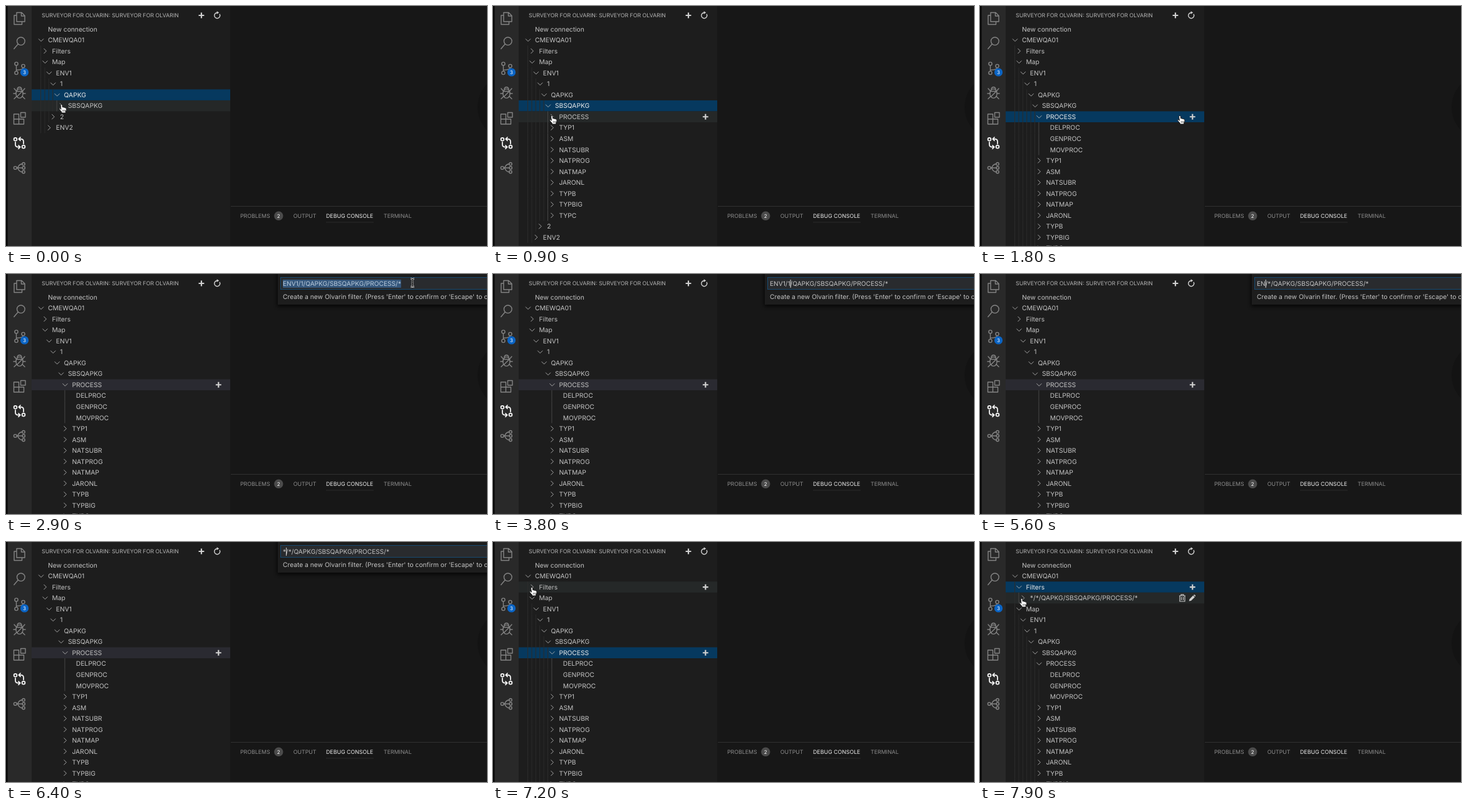
Recreate the animation shown at these times as an HTML page. Size 768x384 px, loop 8000 ms.

```html
<!DOCTYPE html>
<html lang="en">
<head>
<meta charset="utf-8">
<title>Tree filter</title>
<style>
  html, body { margin: 0; width: 100%; height: 100%; overflow: hidden; background: #171717; }
  svg { display: block; width: 768px; height: 384px; font-family: Inter, "Liberation Sans", sans-serif; }
  text { font-size: 10.25px; fill: #c4c4c4; white-space: pre; text-rendering: geometricPrecision; }
  .cap { font-size: 8.8px; fill: #b4b4b4; }
  .dim { fill: #8d8d8d; }
  .on { fill: #ececec; }
  .tiny { font-size: 8px; fill: #fff; text-anchor: middle; }
  .icon { fill: none; stroke: #848484; stroke-width: 1.4; stroke-linejoin: round; stroke-linecap: round; }
  .chev { fill: none; stroke: #b4b4b4; stroke-width: .9; }
  .plus { stroke: #d0d0d0; stroke-width: 2.2; }
  #entry { font-size: 10.15px; }
</style>
</head>
<body>
<svg viewBox="0 0 768 384">
  <defs>
    <filter id="blur" x="-10%" y="-30%" width="120%" height="170%"><feGaussianBlur stdDeviation="3"/></filter>
    <path id="plus" class="plus" d="M-4.4 0H4.4M0 -4.4V4.4"/>
    <g id="trash" fill="none" stroke="#c8c8c8" stroke-width="1.2">
      <path d="M-5 -3.6H5M-2 -3.6V-5.4H2V-3.6M-4 -3.6V5.4H4V-3.6M-1.5 -1.5V3.5M1.5 -1.5V3.5"/>
    </g>
    <path id="pencil" fill="#d0d0d0" d="M-5 5L-4.2 1.8L1.6 -4L4.2 -1.4L-1.7 4.3ZM2.3 -4.6L3.2 -5.3Q4 -5.6 4.9 -4.6Q5.6 -3.8 5.2 -2.8L4.8 -2Z"/>
  </defs>

  <rect width="768" height="384" fill="#171717"/>
  <circle cx="806" cy="162" r="53" fill="#131313"/>
  <rect width="358" height="384" fill="#1d1d1d"/>
  <rect width="41" height="384" fill="#292929"/>
  <rect width="2.5" height="384" fill="#060606"/>

  <g class="icon">
    <path d="M17 10.5H25L30 15.5V25H17ZM24.5 10.5V16H30M17 15H13V29.5H25.5V25"/>
    <path d="M19.4 60.8L12.8 68.5"/><circle cx="23.8" cy="56.3" r="6.3"/>
    <circle cx="16.5" cy="92.5" r="2.6"/><circle cx="16.5" cy="107" r="2.6"/><circle cx="27.5" cy="96" r="2.6"/>
    <path d="M16.5 95V104.4M27.5 98.6Q27 102 17 102.5"/>
    <ellipse cx="21.5" cy="140" rx="5.6" ry="7.4"/>
    <path d="M16.5 136.5H26.5M18 144.5L25.5 137M16 140H12M27 140H31M16.5 136L13 132M26.5 136L30 132M17 144.5L13 148.5M26 144.5L30 148.5M18 133Q18.5 129.8 21.5 129.8Q24.5 129.8 25 133"/>
    <path d="M12.5 173H20.5V181H28.5V189H12.5ZM12.5 181H20.5V189M23.5 170.5H31V178H23.5Z"/>
    <g stroke="#f4f4f4" stroke-width="1.8">
      <circle cx="15" cy="213.2" r="2.4"/><circle cx="28" cy="225.3" r="2.4"/>
      <path d="M20.5 212.8H23.5Q28 212.8 28 217V220.5M23 210.2L20.3 212.8L23 215.4M22.5 225.7H19.5Q15 225.7 15 221.5V218M20 223.1L22.7 225.7L20 228.3"/>
    </g>
    <circle cx="14.8" cy="259" r="2.4"/><circle cx="28" cy="252.7" r="2.2"/><circle cx="28.2" cy="259" r="2.2"/><circle cx="28" cy="265.5" r="2.2"/>
    <path d="M17.2 259H26M18.5 259Q21 252.7 25.8 252.7M18.5 259Q21 265.5 25.8 265.5"/>
  </g>
  <circle cx="29.5" cy="106" r="6.6" fill="#0b64c4"/>
  <text class="tiny" x="29.5" y="109">3</text>

  <text class="cap" x="57" y="18">SURVEYOR FOR OLVARIN: SURVEYOR FOR OLVARIN</text>
  <use href="#plus" x="312" y="15"/>
  <path d="M341 12.8A4.5 4.5 0 1 1 337 10.7" fill="none" stroke="#d0d0d0" stroke-width="1.4"/>
  <path d="M336.6 8.3V13L340.2 10.6Z" fill="#d0d0d0"/>

  <g id="tree"></g>

  <rect x="359" y="320" width="409" height="1" fill="#313131"/>
  <text class="cap dim" x="374" y="339.3">PROBLEMS</text>
  <circle cx="435.3" cy="335.8" r="7.2" fill="#4b4b4b"/>
  <text class="tiny" x="435.3" y="338.8">2</text>
  <text class="cap dim" x="458.7" y="339.3">OUTPUT</text>
  <text class="cap on" x="511" y="339.3">DEBUG CONSOLE</text>
  <rect x="511" y="345.5" width="76" height="1" fill="#2c2c2c"/>
  <text class="cap dim" x="603" y="339.3">TERMINAL</text>

  <g id="box">
    <rect x="433" y="-6" width="350" height="58" fill="#000" opacity=".75" filter="url(#blur)"/>
    <rect x="434" y="-2" width="340" height="51" fill="#1d1d1d"/>
    <rect x="438.5" y="5.5" width="340" height="19" fill="#292b2e" stroke="#174a70"/>
    <rect id="mark" x="442" y="9" height="13" fill="#35577c"/>
    <text id="entry" x="442" y="19.2"></text>
    <rect id="caret" y="9" width="1" height="13" fill="#d8d8d8"/>
    <text x="442" y="40">Create a new Olvarin filter. (Press 'Enter' to confirm or 'Escape' to cancel)</text>
  </g>

  <g id="hand">
    <path fill="#fff" stroke="#111" stroke-width=".9" stroke-linejoin="round"
      d="M-1.4 .8Q-1.2 -.8 .2 -.6Q1.2 -.4 1.3 .8L1.7 4Q3.2 3.1 4 4.5Q5.4 3.8 6.1 5.1Q7.6 4.7 7.9 6.2Q8.3 9 6.7 11V13H.3V11.4Q-1.6 9.6 -3.5 7Q-4 5.5 -2.4 5.7L-.6 7.3Z"/>
    <path d="M2.3 8V11M4.2 8V11M6 8V11" stroke="#333" stroke-width=".7"/>
  </g>
  <path id="arrow" d="M0 0V12L3 9.3L5 13.8L7 13L5 8.6H9Z" fill="#000" stroke="#fff" stroke-width=".9"/>
  <g id="beam" fill="none">
    <path d="M-3 -6.5Q0 -6.5 0 -4.5V4.5Q0 6.5 -3 6.5M3 -6.5Q0 -6.5 0 -4.5V4.5Q0 6.5 3 6.5M-1.6 1.8H1.6" stroke="#eee" stroke-width="2.6"/>
    <path d="M-3 -6.5Q0 -6.5 0 -4.5V4.5Q0 6.5 -3 6.5M3 -6.5Q0 -6.5 0 -4.5V4.5Q0 6.5 3 6.5M-1.6 1.8H1.6" stroke="#111" stroke-width="1"/>
  </g>
</svg>
<script>
const LOOP = 8000, ROW = 17.53, TOP = 37, STEP = 6.4;
const $ = id => document.getElementById(id);
const TAIL = "/QAPKG/SBSQAPKG/PROCESS/*";
const TYPES = ["TYP1", "ASM", "NATSUBR", "NATPROG", "NATMAP", "JARONL", "TYPB", "TYPBIG", "TYPC"];

// time, selected row, SBSQAPKG open, PROCESS open, Filters open
const TREE = [
  [0, "QAPKG", 0, 0, 0],
  [400, "SBSQAPKG", 1, 0, 0],
  [1000, "PROCESS", 1, 1, 0],
  [7300, "Filters", 1, 1, 1]
];

// time, text before the caret, text after it
const TYPING = [
  [2600, "ENV1/1" + TAIL, ""],
  [3600, "ENV1/1", TAIL],
  [4000, "ENV1/", TAIL],
  [4300, "ENV1/*", TAIL],
  [4800, "ENV1/", "*" + TAIL],
  [5000, "ENV1", "/*" + TAIL],
  [5200, "ENV", "/*" + TAIL],
  [5500, "EN", "/*" + TAIL],
  [5700, "E", "/*" + TAIL],
  [5900, "", "/*" + TAIL],
  [6200, "*", "/*" + TAIL]
];
const OPEN = 2600, CLOSE = 6800;

// time, x, y of the pointer tip
const PATH = [
  [0, 88.5, 158], [450, 88.5, 158], [800, 94, 176], [1100, 94, 176],
  [1700, 319, 176], [1950, 319, 176], [2150, 338, 177], [2500, 338, 177],
  [2850, 649, 14], [3200, 649, 14], [3550, 476, 15], [6850, 476, 15],
  [7150, 62, 73], [7450, 62, 73], [7800, 66.5, 91], [8000, 66.5, 91]
];

const at = (table, t) => table.filter(s => s[0] <= t).pop();

function pointer(t) {
  const i = Math.max(1, PATH.findIndex(p => p[0] > t));
  const [a, x, y] = PATH[i - 1], [b, u, v] = PATH[i];
  const k = (t - a) / (b - a), e = k * k * (3 - 2 * k);
  return [x + (u - x) * e, y + (v - y) * e];
}

// row: name, depth, kind ("open", "shut" or "leaf"), actions
function rows([, , sub, proc, filters]) {
  const list = [
    ["New connection", 0, "leaf"],
    ["CMEWQA01", 0, "open"],
    ["Filters", 1, filters ? "open" : "shut", "plus"]
  ];
  if (filters) list.push(["*/*" + TAIL, 2, "shut", "edit"]);
  list.push(["Map", 1, "open"], ["ENV1", 2, "open"], ["1", 3, "open"],
    ["QAPKG", 4, "open"], ["SBSQAPKG", 5, sub ? "open" : "shut"]);
  if (sub) {
    list.push(["PROCESS", 6, proc ? "open" : "shut", "plus"]);
    if (proc) for (const n of ["DELPROC", "GENPROC", "MOVPROC"]) list.push([n, 7, "leaf"]);
    for (const n of TYPES) list.push([n, 6, "shut", "plus"]);
  }
  list.push(["2", 3, "shut"], ["ENV2", 2, "shut"]);
  return list.slice(0, 21);
}

function drawTree(state, hover, inTree, focused) {
  const list = rows(state), sel = list.findIndex(r => r[0] === state[1]);
  const depth = list[sel][1];
  let inside = false;
  return list.map(([name, d, kind, actions], i) => {
    const y = TOP + i * ROW, x = 56 + d * STEP;
    const chosen = i === sel, hot = chosen || i === hover;
    if (i > sel) inside = d > depth && (inside || i === sel + 1);
    let s = "";
    if (hot) {
      const fill = !chosen ? "#252828" : focused ? "#06395f" : "#2a2a31";
      s += `<rect x="41" y="${y - ROW / 2}" width="317" height="${ROW}" fill="${fill}"/>`;
    }
    for (let k = 0; k < d; k++) {
      const active = inside && k === depth;
      if (active || inTree)
        s += `<rect x="${55 + k * STEP}" y="${y - ROW / 2}" width="1" height="${ROW}" fill="${active ? "#464646" : "#2c2c2c"}"/>`;
    }
    if (kind !== "leaf")
      s += `<path class="chev" transform="translate(${x} ${y})" d="${kind === "open" ? "M-4 -2L0 2L4 -2" : "M-2 -4L2 0L-2 4"}"/>`;
    s += `<text x="${x + 11}" y="${y + 3.7}"${chosen && focused ? ' class="on"' : ""}>${name}</text>`;
    if (hot && actions === "plus") s += `<use href="#plus" x="339.3" y="${y}"/>`;
    if (hot && actions === "edit") s += `<use href="#trash" x="323" y="${y}"/><use href="#pencil" x="338.7" y="${y}"/>`;
    return s;
  }).join("");
}

function drawBox(t) {
  const [start, before, after] = at(TYPING, t);
  const entry = $("entry"), all = start === OPEN;
  entry.textContent = before + after;
  const w = before ? entry.getSubStringLength(0, before.length) : 0;
  $("mark").setAttribute("width", all ? w : 0);
  entry.style.fill = all ? "#b9cbdd" : "";
  $("caret").setAttribute("x", 442 + w);
  show("caret", !all);
}

function show(id, on) { $(id).style.display = on ? "" : "none"; }

let last = "";
function render(t) {
  const open = t >= OPEN && t < CLOSE;
  const [x, y] = pointer(t);
  const seen = t < 3800 || t >= CLOSE;
  const inTree = seen && x > 41 && x < 358;
  const hover = inTree ? Math.round((y - TOP) / ROW) : -1;
  const state = at(TREE, t);
  const key = [state[0], hover, inTree, open].join();
  if (key !== last) {
    $("tree").innerHTML = drawTree(state, hover, inTree, !open);
    last = key;
  }
  show("box", open);
  if (open) drawBox(t);
  const kind = !seen ? "" : inTree ? "hand" : open && x > 438 && y < 26 ? "beam" : "arrow";
  for (const id of ["hand", "arrow", "beam"]) {
    show(id, id === kind);
    $(id).setAttribute("transform", `translate(${x} ${y})`);
  }
}

const begin = performance.now();
function tick() {
  render((performance.now() - begin) % LOOP);
  requestAnimationFrame(tick);
}
tick();
</script>
</body>
</html>
```
